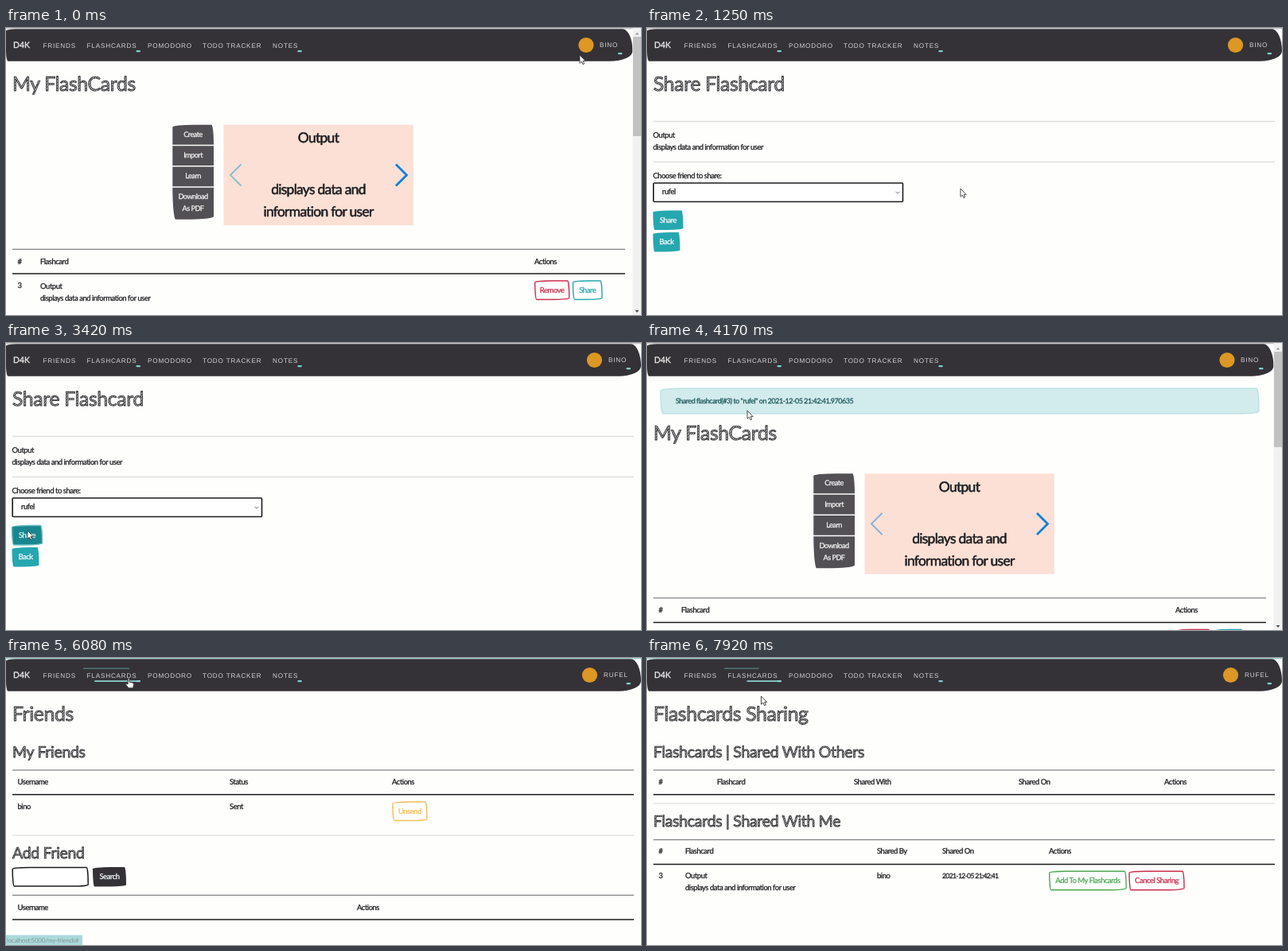
Write an HTML page that moves like this. It is 798 px wide and 361 px high and loops after 8000 ms.

```html
<!DOCTYPE html>
<html lang="en">
<head>
<meta charset="utf-8">
<title>Flashcard sharing</title>
<style>
html, body { margin: 0; width: 100%; height: 100%; overflow: hidden; background: #fefefd; }
svg { display: block; width: 798px; height: 361px; }
text { font-family: Lato, "Open Sans", sans-serif; text-rendering: geometricPrecision; white-space: pre; }
.h { fill: url(#hatch); stroke: #2e2e31; stroke-width: .8px; letter-spacing: -.015em; }
.n { font: 8.2px "Liberation Sans", Arial, sans-serif; letter-spacing: .8px; fill: #d3d2d4; }
</style>
</head>
<body>
<svg id="stage" viewBox="0 0 798 361" xmlns="http://www.w3.org/2000/svg"></svg>
<script>
const LOOP = 8000;
const INK = '#1c1c1f', DARK = '#343236', TEAL = '#25a7b0', RED = '#cb2c4d';
const HOST = 'bino', GUEST = 'rufel';

// Text, lines and hand-drawn boxes
const text = (x, y, s, { c = INK, size = 9.5, anchor = 'start', ls = -.05 } = {}) =>
  `<text x="${x}" y="${y - .9}" font-size="${size}" fill="${c}" stroke="${c}" stroke-width="${size * .03}" text-anchor="${anchor}" letter-spacing="${ls}em">${s}</text>`;
const head = (y, s, size = 24.8) => `<text class="h" x="8" y="${y}" font-size="${size}">${s}</text>`;
const sub = (y, s) => head(y, s, 19.45);
const line = (y, x2, c = '#66666a', w = 1) => `<path d="M8 ${y}H${x2}" stroke="${c}" stroke-width="${w}"/>`;
const rule = y => line(y, 789, '#dededf', 1.5);
const tableHead = (y, x2, base, cols) =>
  line(y, x2) + line(y + 30.8, x2, INK, 1.5) + cols.map(([x, s]) => text(x, base, s)).join('');

// Corner radii run clockwise from the top left and shrink together, as in CSS
const SKETCH = [[255, 25, 225, 25], [25, 225, 25, 255]];
const BAR = [[25, 25, 55, 5], [5, 55, 25, 25]];
const GROUP_TOP = [[255, 25, 0, 0], [25, 225, 0, 0]];
const GROUP_END = [[0, 0, 225, 25], [0, 0, 25, 255]];

function outlinePath(x, y, w, h, [hr, vr]) {
  const f = Math.min(1, w / (hr[0] + hr[1]), w / (hr[2] + hr[3]), h / (vr[0] + vr[3]), h / (vr[1] + vr[2]));
  const [a, b, c, d] = hr.map(r => r * f), [p, q, r, s] = vr.map(v => v * f);
  return `M${x + a} ${y}H${x + w - b}A${b} ${q} 0 0 1 ${x + w} ${y + q}V${y + h - r}` +
    `A${c} ${r} 0 0 1 ${x + w - c} ${y + h}H${x + d}A${d} ${s} 0 0 1 ${x} ${y + h - s}V${y + p}A${a} ${p} 0 0 1 ${x + a} ${y}Z`;
}
const box = (x, y, w, h, fill, stroke = 'none', sw = 1.4, radii = SKETCH) =>
  `<path d="${outlinePath(x, y, w, h, radii)}" fill="${fill}" stroke="${stroke}" stroke-width="${sw}"/>`;
const button = (x, y, w, h, s, fill, edge, ink) =>
  box(x, y, w, h, fill, edge) + text(x + w / 2, y + h / 2 + 4, s, { c: ink, anchor: 'middle' });
const outline = (x, y, w, s, c) => button(x, y, w, 23.5, s, '#fff', c, c);
const solid = (x, y, w, h, s, c) => button(x, y, w, h, s, c, 'none', '#f4fafa');
const caret = (x, y) => `<rect x="${x}" y="${y}" width="5.5" height="2.2" rx="1" fill="#7fcfd0"/>`;

function navbar(w, user, avatarX, nameX, strip) {
  const links = [[46.5, 'FRIENDS'], [101.5, 'FLASHCARDS'], [178, 'POMODORO'], [247, 'TODO TRACKER'], [335, 'NOTES']];
  return `<rect width="798" height="1.4" fill="${strip}"/>` + box(0, 1.3, w, 40.4, DARK, 'none', 0, BAR) +
    text(9, 25.7, 'D4K', { c: '#e8e8e8', size: 10.5, ls: 0 }) +
    links.concat([[nameX, user.toUpperCase()]])
      .map(([x, s], i) => `<text class="n" x="${x}" y="${i < 5 ? 24.7 : 23.9}">${s}</text>`).join('') +
    caret(163.5, 28) + caret(366.3, 28) + caret(w - 18.5, 31) +
    `<circle cx="${avatarX}" cy="21.5" r="9.6" fill="#dc9724"/>`;
}

const scrollbar = thumb => `<rect x="787.5" width="10.5" height="361" fill="#f1f1f1"/>
  <rect x="788" y="11" width="10" height="${thumb}" fill="#c1c1c1"/>
  <path d="M790.5 8.5h5l-2.5-3z" fill="#a0a0a0"/><path d="M790.5 355h5l-2.5 3z" fill="#505050"/>`;

function cards(left) {
  const items = [[137.5, 'Create'], [164, 'Import'], [190.2, 'Learn'], [216, 'Download'], [231.2, 'As PDF']];
  const big = (y, s) => text(392.5, y, s, { size: 17.5, anchor: 'middle', ls: -.042 });
  const grey = '#525054';
  return head(79, 'My FlashCards') +
    box(209.3, 121.8, 51.7, 25, grey, 'none', 0, GROUP_TOP) +
    `<path d="M209.3 148.2H261V173H209.3ZM209.3 174.5H261V199.3H209.3Z" fill="${grey}"/>` +
    box(209.3, 200.8, 51.7, 40, grey, 'none', 0, GROUP_END) +
    items.map(([y, s]) => text(235, y, s, { c: '#f3f3f3', size: 9.2, anchor: 'middle', ls: -.06 })).join('') +
    `<rect x="273.5" y="121.7" width="238.5" height="126.5" fill="#fce0d6"/>` +
    big(145, 'Output') + big(210, 'displays data and') + big(238, 'information for user') +
    `<g fill="none"><path d="M295.5 171.5 282 185 295.5 198.5" stroke="${left}" stroke-width="1.8"/>
     <path d="M490 171.5 503.5 185 490 198.5" stroke="#0d80dc" stroke-width="2.8"/></g>` +
    tableHead(278.3, 778, 297.5, [[14.5, '#'], [43, 'Flashcard'], [664, 'Actions']]) +
    text(14.5, 328, '3') + text(43, 328.5, 'Output') + text(43, 343.5, 'displays data and information for user') +
    outline(664.7, 318, 43, 'Remove', RED) + outline(712.5, 318, 36.5, 'Share', TEAL);
}

const listPage = navbar(787.5, HOST, 729, 746, '#c9c9cc') + scrollbar(125) + cards('#85bccf') +
  `<g id="rowHover">${solid(712, 317.5, 37.5, 24.5, 'Share', TEAL)}</g>`;

const sharePage = navbar(798, HOST, 739.5, 757, '#c9c9cc') + head(79, 'Share Flashcard') +
  rule(117.5) + text(7.5, 139, 'Output') + text(7.5, 154, 'displays data and information for user') + rule(168.5) +
  text(7.5, 190.3, 'Choose friend to share:') +
  `<rect x="8.2" y="195" width="313.3" height="23.5" rx="1" fill="#fff" stroke="${INK}" stroke-width="1.6"/>` +
  text(19, 210.3, GUEST) +
  `<path d="M312.5 205.8l2.5 2.5 2.5-2.5" fill="none" stroke="#777"/>` +
  solid(7.5, 229.5, 38, 24.5, 'Share', TEAL) + solid(7.5, 257, 34, 24.5, 'Back', TEAL) +
  `<g id="shareHover">${button(7.5, 229.5, 38, 24.5, 'Share', '#198790', '#6fbfc5', '#e9f4f4')}</g>`;

const donePage = navbar(787.5, HOST, 729, 746, '#c9c9cc') +
  `<g transform="translate(0 42.5)">${cards('#7fb0e0')}</g>` + scrollbar(120) +
  box(17, 57, 752, 32, '#d2ebec', '#b0dbde', 1) +
  text(36, 76.8, `Shared flashcard(#3) to "${GUEST}" on 2021-12-05 21:42:41.970635`, { c: '#1c565b', size: 9, ls: -.054 });

const friendsPage = navbar(798, GUEST, 733.5, 751, '#a5d3d5') + head(79, 'Friends') + sub(125, 'My Friends') +
  tableHead(141, 789, 160, [[14.5, 'Username'], [281, 'Status'], [485, 'Actions']]) +
  text(14.5, 191, HOST) + text(281, 191, 'Sent') + outline(486, 181, 43, 'Unsend', '#f3bd5a') +
  line(223, 789, '#d8d8d9') + sub(252, 'Add Friend') +
  box(8.2, 263.5, 95, 23.5, '#fff', INK, 1.5) + solid(109, 263, 42, 24.5, 'Search', DARK) +
  tableHead(298.3, 789, 317.5, [[14.5, 'Username'], [441, 'Actions']]);

const sharingPage = navbar(798, GUEST, 733.5, 751, '#a5d3d5') + head(79, 'Flashcards Sharing') +
  sub(125, 'Flashcards | Shared With Others') +
  tableHead(141, 789, 160, [[14.5, '#'], [88, 'Flashcard'], [260, 'Shared With'], [467, 'Shared On'], [650, 'Actions']]) +
  line(183, 789, '#d8d8d9') + sub(212, 'Flashcards | Shared With Me') +
  tableHead(228.7, 789, 247.3, [[14.5, '#'], [48, 'Flashcard'], [289, 'Shared By'], [371, 'Shared On'], [505, 'Actions']]) +
  text(14.5, 278, '3') + text(48, 278.3, 'Output') + text(48, 293.3, 'displays data and information for user') +
  text(289, 278.3, HOST) + text(371, 278.3, '2021-12-05 21:42:41', { size: 8.7, ls: -.08 }) +
  outline(505.7, 268.2, 96.5, 'Add To My Flashcards', '#4da855') + outline(606, 268.2, 69, 'Cancel Sharing', RED);

const pages = [[0, listPage], [1080, sharePage], [3830, donePage], [5000, friendsPage], [6920, sharingPage]];

document.getElementById('stage').innerHTML = `
  <defs><pattern id="hatch" width="2.2" height="2.2" patternUnits="userSpaceOnUse" patternTransform="rotate(38)">
    <rect width="2.2" height="2.2" fill="#e6e6e6"/><rect width="1.2" height="2.2" fill="#48484b"/></pattern></defs>
  <rect width="798" height="361" fill="#fefefd"/>
  ${pages.map(([, p], i) => `<g id="page${i}">${p}</g>`).join('')}
  <g id="hoverLines"><rect id="over" x="97" y="12.6" height="1" fill="#5f9699"/>
    <rect id="under" y="28.2" height="1.9" rx=".8" fill="#8fd0d2"/></g>
  <g id="status"><rect id="statusBox" y="348.5" height="12.5" fill="#62bcbf"/>
    <text id="statusText" x="1" y="358.3" font-size="7.9" fill="#1d3b3d" letter-spacing="-.03em"></text></g>
  <g id="cursor">
    <path id="arrow" d="M0 0V10.3L2.4 8.2 4 11.8 5.7 11 4.2 7.6H7.2Z" fill="#fff" stroke="#38383c" stroke-width=".9"/>
    <path id="hand" d="M-.8 1Q0-.6 1 1V5.2L5.6 6.2Q6.8 6.8 6.4 9L5.6 12.8H0L-3.4 8.2Q-3.4 6.6-.8 8Z" fill="#fff" stroke="#38383c" stroke-width=".9"/>
  </g>`;

// Time, x, y
const moves = [
  [0, 721, 34], [80, 721, 34], [720, 729, 328], [1000, 729, 328], [1250, 394, 202], [1750, 394, 202],
  [2400, 200, 214], [3000, 27, 236], [3800, 27, 236], [4170, 126, 85], [4999, 126, 85], [5000, 120, 140],
  [5700, 120, 75], [6000, 154, 25], [6150, 154, 25], [6500, 163, 73], [7420, 163, 73], [7600, 148, 24],
  [7760, 147, 24], [7920, 143.5, 48], [LOOP, 143, 51]
];
const $ = id => document.getElementById(id);
const clamp = v => Math.max(0, Math.min(1, v));
const ramp = (t, start, len) => clamp((t - start) / len);
const within = (t, a, b) => t >= a && t < b;
const show = (id, on) => $(id).setAttribute('display', on ? 'inline' : 'none');

function pointer(t) {
  const i = moves.findIndex((m, k) => k > 0 && t <= m[0]);
  const [a, b] = [moves[i - 1], moves[i]];
  const u = ramp(t, a[0], b[0] - a[0]), e = u * u * (3 - 2 * u);
  return [a[1] + (b[1] - a[1]) * e, a[2] + (b[2] - a[2]) * e];
}

function draw(t) {
  pages.forEach(([start], i) => show('page' + i, within(t, start, i + 1 < pages.length ? pages[i + 1][0] : LOOP)));
  show('rowHover', t >= 690);
  show('shareHover', t >= 2900);

  const hover = ramp(t, 5920, 200) - ramp(t, 6280, 200) + ramp(t, 7540, 200) - ramp(t, 7842, 200);
  const w = 72 * clamp(hover);
  show('hoverLines', w > .1);
  $('over').setAttribute('width', w);
  $('under').setAttribute('width', w);
  $('under').setAttribute('x', 169 - w);

  const sharing = t >= 6430;
  show('status', within(t, 5980, 6920));
  $('status').setAttribute('opacity', sharing ? 1 : ramp(t, 5980, 190));
  $('statusBox').setAttribute('width', sharing ? 116 : 96);
  $('statusText').textContent = 'localhost:5000/' + (sharing ? 'flashcards-sharing' : 'my-friends#');

  const [x, y] = pointer(t);
  const onLink = within(t, 5940, 6250) || within(t, 7560, 7820);
  $('cursor').setAttribute('transform', `translate(${x} ${y})`);
  show('hand', onLink);
  show('arrow', !onLink);
}

const begin = performance.now();
function tick() {
  draw((performance.now() - begin) % LOOP);
  requestAnimationFrame(tick);
}
tick();
</script>
</body>
</html>
```
